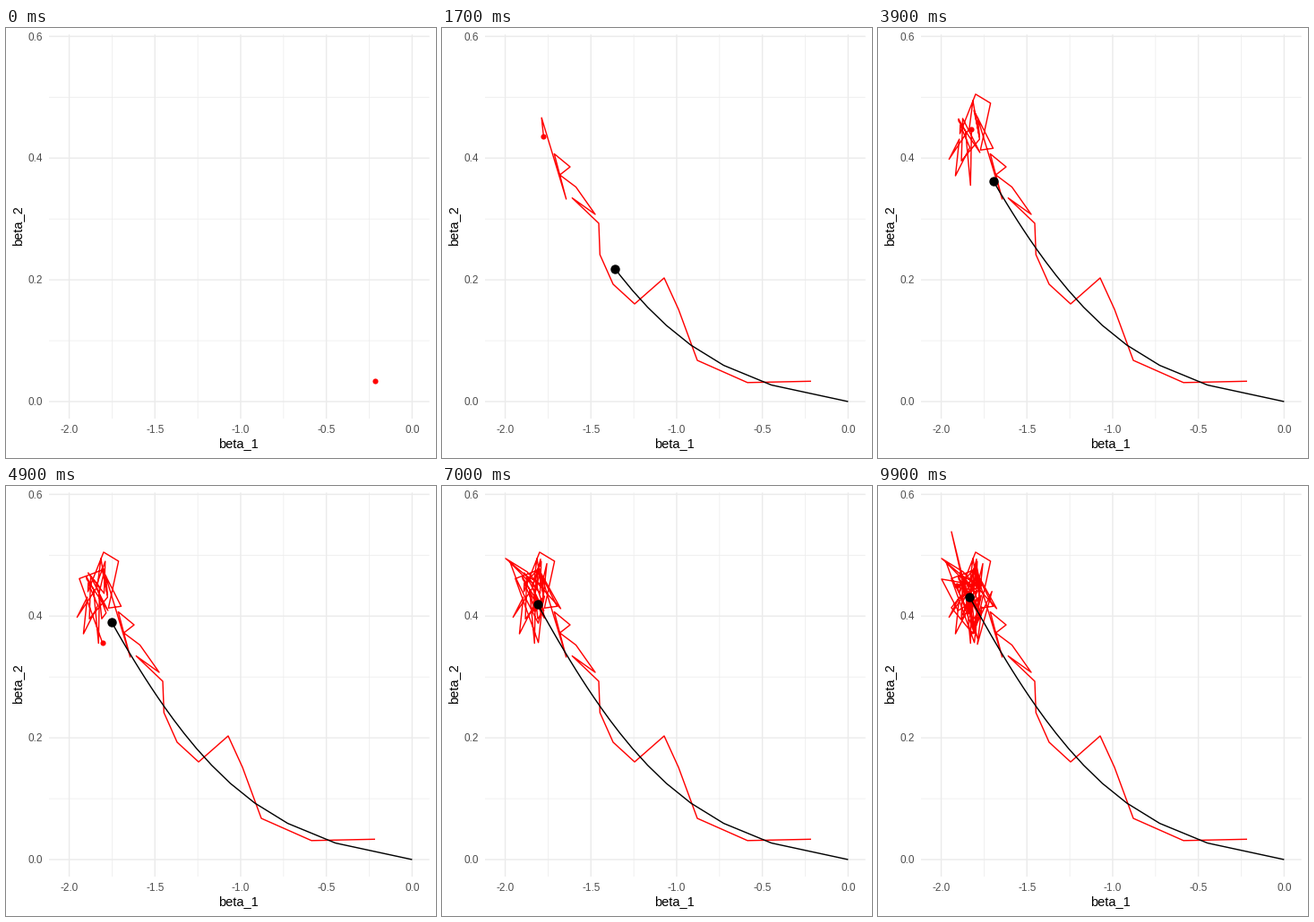
A matplotlib script that plays this animation: 480 by 480 pixels, repeating every 10000 ms.

```python
import numpy as np
import matplotlib.pyplot as plt
from matplotlib.animation import FuncAnimation

SIZE, DPI, FRAMES = 480, 96, 100
PX = 72 / DPI
X0, X_UNIT = 453.36, 191.4
Y0, Y_UNIT = 417, 679.4
LEFT, RIGHT, TOP, BOTTOM = 48, 472.67, 7.33, 436
GOAL = np.array((100.2, 121))

plt.rcParams["font.family"] = "Liberation Sans"
plt.rcParams["path.simplify"] = False


def noisy_path():
    """Stochastic descent: a jagged approach, then jitter about the goal."""
    approach = [
        (412, 394.3), (341, 395.8), (285, 371), (264, 314), (248, 279),
        (215, 308), (191, 286), (176.3, 253), (175, 218), (145.3, 189.7),
        (171, 208), (149.5, 177.5), (131.5, 164), (143, 155),
    ]
    n = np.arange(FRAMES - len(approach))[:, None]
    centre = GOAL + (30, 36) * np.exp(-n / 4)
    rng = np.random.default_rng(4)
    cov = [(160, 90), (90, 680)]
    jitter = rng.multivariate_normal((0, 0), cov, len(n))
    cloud = np.clip(centre + jitter, (71, 51), (140, 202))
    return np.vstack((approach, cloud))


def smooth_path():
    """Full descent: one step every two frames from frame 2, fast at first."""
    n = np.arange(FRAMES // 2)
    x_rate = 0.0886 + 1 / (0.9 * n + 4.4)
    y_rate = 0.0965 - 0.045 * np.exp(-n / 3)
    decay = np.exp(-np.column_stack((n * x_rate, n * y_rate)))
    return 2 + 2 * n, GOAL + ((X0, Y0) - GOAL) * decay


fig = plt.figure(figsize=(SIZE / DPI, SIZE / DPI), dpi=DPI, facecolor="white")
ax = fig.add_axes((0, 0, 1, 1))
ax.set(xlim=(0, SIZE), ylim=(SIZE, 0))
ax.axis("off")


def grid(x, y, width):
    ax.plot(x, y, color="#EBEBEB", lw=width * PX, solid_capstyle="butt",
            snap=False, zorder=1)


def label(x, y, text, size=8.8, color="#4D4D4D", **kw):
    ax.text(x, y, text, fontsize=size, color=color, va="baseline",
            rotation_mode="anchor", **kw)


def draw_axes():
    for i in range(9):
        v = -2 + i * 0.25
        x = X0 + v * X_UNIT
        grid((x, x), (TOP, BOTTOM), 0.71 if i % 2 else 1.42)
        if i % 2 == 0:
            label(x, 452, f"{v:.1f}", ha="center")
    for i in range(7):
        v = i * 0.1
        y = Y0 - v * Y_UNIT
        grid((LEFT, RIGHT), (y, y), 0.71 if i % 2 else 1.42)
        if i % 2 == 0:
            label(41, y + 4.2, f"{v:.1f}", ha="right")
    label((LEFT + RIGHT) / 2 - 1, 468, "beta_1", 11, "black", ha="center")
    label(17, (TOP + BOTTOM) / 2 - 1, "beta_2", 11, "black", ha="center",
          rotation=90)


def trail(color, diameter, z):
    line, = ax.plot([], [], color=color, lw=1.42 * PX, zorder=z,
                    solid_joinstyle="round", solid_capstyle="butt")
    dot, = ax.plot([], [], "o", color=color, ms=diameter * PX, mew=0,
                   zorder=z + 1)
    return line, dot


def show(parts, points):
    line, dot = parts
    line.set_data(points[:, 0], points[:, 1])
    dot.set_data(points[-1:, 0], points[-1:, 1])


draw_axes()
noisy = noisy_path()
steps, smooth = smooth_path()
red = trail("red", 6.15, 2)
black = trail("black", 10.4, 4)


def update(t):
    show(red, noisy[:t + 1])
    if t < steps[0]:
        show(black, np.empty((0, 2)))
    else:
        head = [np.interp(t, steps, smooth[:, k]) for k in (0, 1)]
        show(black, np.vstack((smooth[steps <= t], head)))
    return (*red, *black)


anim = FuncAnimation(fig, update, frames=FRAMES, init_func=lambda: update(0),
                     interval=100, repeat=True, repeat_delay=0)
plt.show()
```
